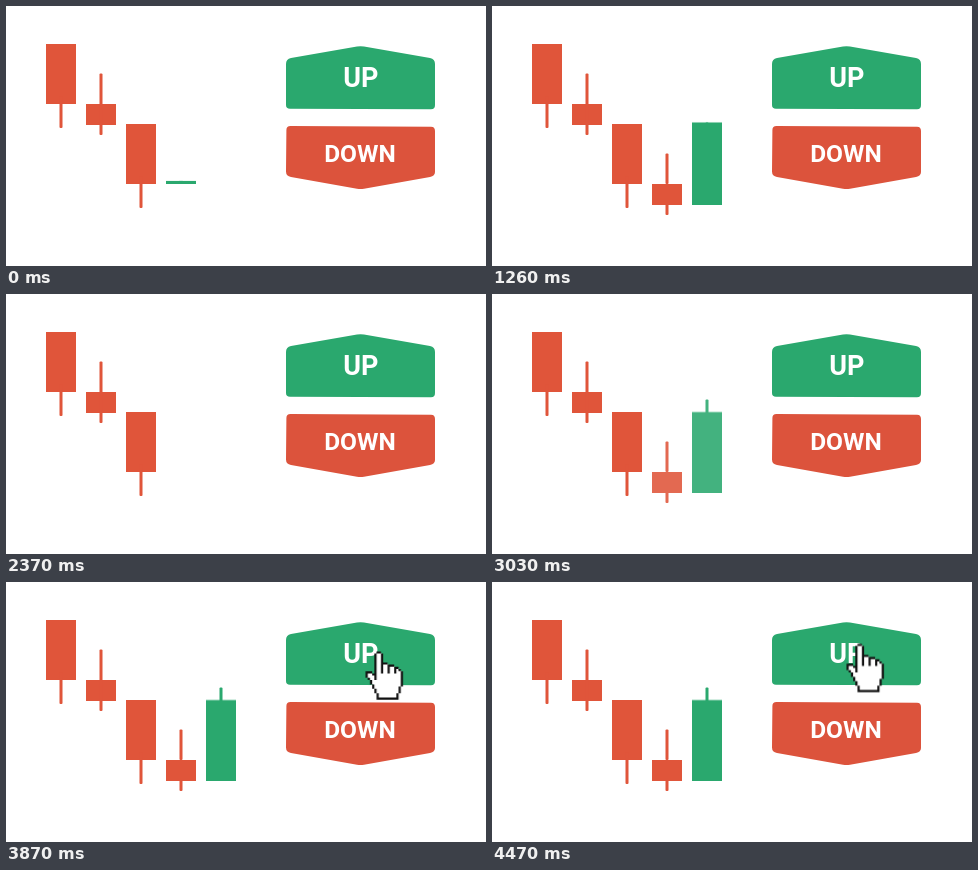
Recreate the animation shown at these times as an HTML page without scripts. Size 480 by 260 pixels, loop 4.8 s.

```html
<!DOCTYPE html>
<html lang="en">
<head>
<meta charset="utf-8">
<title>Up or down</title>
<style>
  html, body { margin: 0; width: 100%; height: 100%; overflow: hidden; background: #fff; }
  svg { display: block; width: 480px; height: 260px; }

  .red { fill: #e0553a; }
  .green { fill: #2aa86e; }
  text { fill: #fff; font-family: Roboto, Arial, sans-serif; font-weight: 700; text-anchor: middle; }

  .live, .live *, .hand, .press { animation: 4.8s linear infinite; }

  /* Fourth candle opens at 178, fifth opens at 199 */
  .live .a { transform-origin: 0 178px; }
  .live .b { transform-origin: 0 199px; }
  .live { animation-name: blink; }
  .live .rise { animation-name: rise; }
  .live .fall { animation-name: fall; }
  .live .high { animation-name: high, tint; }
  .live .low { animation-name: low; }
  .live .rally { animation-name: rally; }
  .live .peak { animation-name: peak; }

  @keyframes rise {
    0% { transform: scaleY(.1); }
    7.5% { transform: scaleY(1); }
    9.96%, 100% { transform: scaleY(0); }
  }
  @keyframes fall {
    0%, 9.96% { transform: scaleY(0); }
    12.5% { transform: scaleY(1); }
    18.75%, 100% { transform: scaleY(.677); }
  }
  @keyframes high {
    0% { transform: scaleY(.1); }
    7.5%, 100% { transform: scaleY(1); }
  }
  @keyframes low {
    0%, 9.96% { transform: scaleY(0); }
    12.5%, 100% { transform: scaleY(1); }
  }
  @keyframes tint {
    0%, 9.95% { fill: #2aa86e; }
    9.96%, 100% { fill: #e0553a; }
  }
  @keyframes rally {
    0%, 18.1% { transform: scaleY(0); }
    18.75% { transform: scaleY(.03); }
    27.3% { transform: scaleY(1); }
    31.25% { transform: scaleY(.524); }
    36.875%, 100% { transform: scaleY(.866); }
  }
  @keyframes peak {
    0%, 18.1% { transform: scaleY(0); }
    18.75% { transform: scaleY(.03); }
    27.3%, 100% { transform: scaleY(1); }
  }
  @keyframes blink {
    0%, 43.75%, 55%, 62.5%, 73.75%, 100% { opacity: 1; }
    49.375%, 68.125% { opacity: 0; }
  }

  .hand { animation-name: reach; }
  @keyframes reach {
    0%, 73.125% {
      transform: translate(138px, 208px);
      animation-timing-function: cubic-bezier(.333, 1, .667, 1);
    }
    84.375%, 100% { transform: none; }
  }

  .press { animation-name: press; }
  .up { transform-origin: 354.5px 72px; --size: .95; }
  .tap { transform-origin: 368px 62px; --size: .92; }
  @keyframes press {
    0%, 86.875%, 93.125%, 100% { transform: scale(1); }
    90% { transform: scale(var(--size)); }
  }
</style>
</head>
<body>
<svg viewBox="0 0 480 260">
  <g class="red">
    <rect x="40" y="38" width="30" height="60"/>
    <rect x="53.5" y="90" width="3" height="32" rx="1"/>
    <rect x="80" y="98" width="30" height="21"/>
    <rect x="93.5" y="67.5" width="3" height="61.5" rx="1"/>
    <rect x="120" y="118" width="30" height="60"/>
    <rect x="133.5" y="170" width="3" height="32" rx="1"/>
  </g>

  <g class="live">
    <rect class="a high" x="173.5" y="147.5" width="3" height="30.5" rx="1"/>
    <rect class="a low red" x="173.5" y="178" width="3" height="31" rx="1"/>
    <rect class="a rise green" x="160" y="148" width="30" height="30"/>
    <rect class="a fall red" x="160" y="178" width="30" height="31"/>
    <rect class="b peak green" x="213.5" y="105.5" width="3" height="93.5" rx="1"/>
    <rect class="b rally green" x="200" y="105.5" width="30" height="93.5"/>
  </g>

  <g class="press up">
    <path class="green" d="M280 58Q280 53 285 52L351 40.6Q354.500 39.900 358 40.600L424 52Q429 53 429 58V99Q429 103.300 425 103.300L284 102.800Q280 102.800 280 99Z"/>
    <text x="354.800" y="81.300" font-size="27">UP</text>
  </g>

  <path fill="#dc533c" d="M284.500 120L425 120.700Q429 120.700 429 125V166Q429 170 424 171L358 182.700Q354.500 183.400 351 182.700L285 171Q280 170 280 165.500L280.400 124Q280.400 120 284.500 120Z"/>
  <text x="354" y="156.300" font-size="24.500">DOWN</text>

  <g class="hand">
    <g class="press tap">
      <g transform="translate(354.500 61.800) scale(2.200)">
        <path fill="#fff" d="M5 .5H7V1H7.500V5.500H10V6H10.500V6.500H13V7H13.500V7.500H15V8.500H16V9H16.500V16H15.500V19H14.500V21.500H5.500V19H4.500V17H3.500V15H2.500V13H1.500V12H.5V9.500H3V10.500H4.500V1H5Z"/>
        <path fill="none" stroke="#111" d="M5 .5h2M4.500 1v12M7.500 1v9M8 5.500h2M10.500 6v4M11 6.500h2M13.500 7v3M14 7.500h1M15 8.500h1M16.500 9v7M15.500 16v3M14.500 19v3M5 21.500h9M5.500 19v2M4.500 17v2M3.500 15v2M2.500 13v2M1.500 12v1M.5 10v2M0 9.500h3M3 10.500h1"/>
      </g>
    </g>
  </g>
</svg>
</body>
</html>
```
